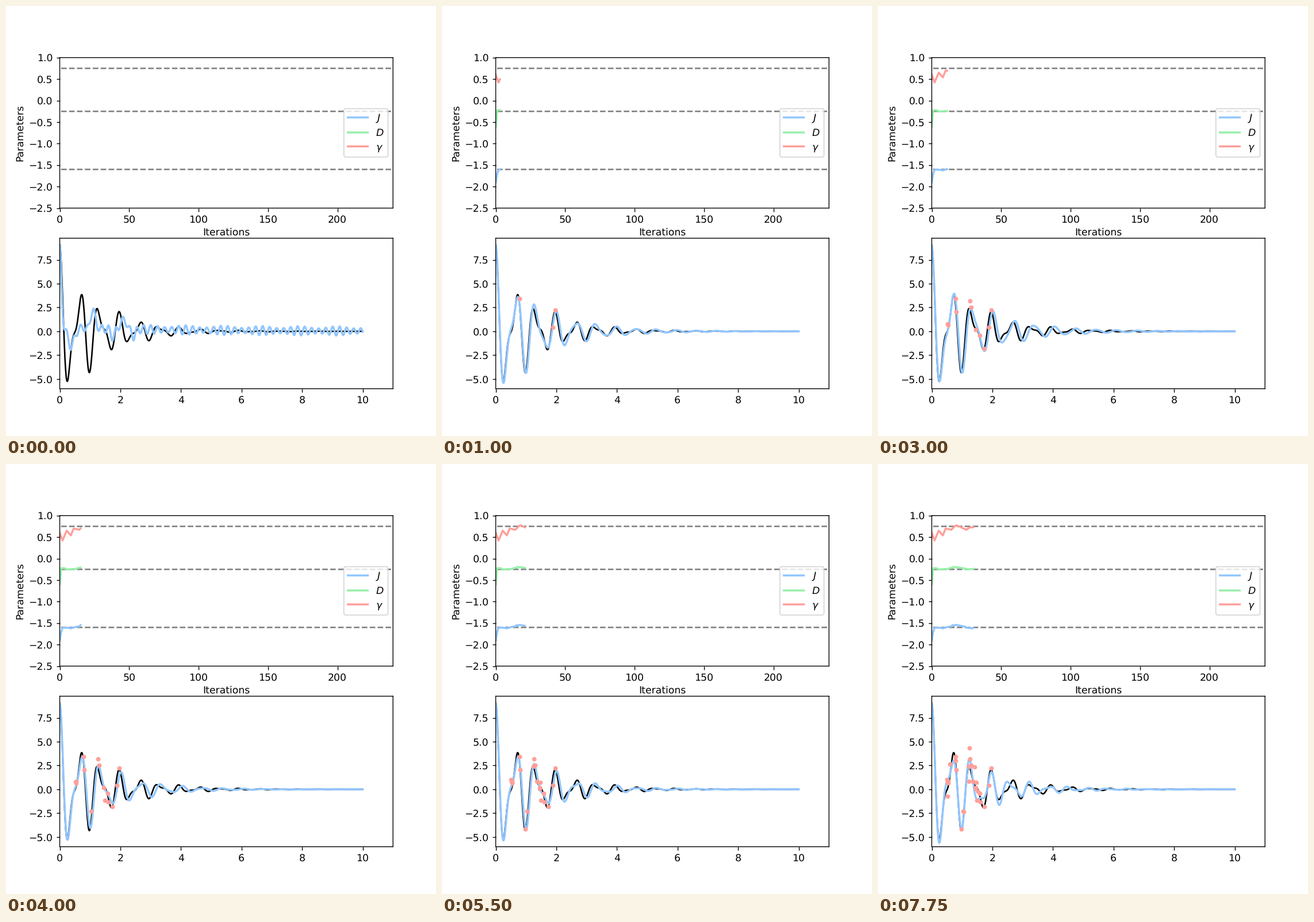
Write a matplotlib script that moves like this. It is 748x748 px and loops after 8 s.

```python
import numpy as np
import matplotlib.pyplot as plt
from matplotlib.animation import FuncAnimation

plt.rcParams.update({"text.hinting": "none", "path.snap": False})

BLUE, GREEN, RED = "#92C6FF", "#97F0AA", "#FF9F9A"
FRAMES, INTERVAL = 32, 250

rng = np.random.default_rng(4)
n_all = np.arange(FRAMES)
t = np.linspace(0, 10, 1000)


def signal(t, slow, slow_decay, fast, fast_decay):
    """Two damped cosines, the slow one twice as strong."""
    return (6.03 * np.exp(-slow_decay * t) * np.cos(slow * t)
            + 3.02 * np.exp(-fast_decay * t) * np.cos(fast * t))


def truth(t):
    return signal(t, 9.55, .75, 16.05, .75)


def prior():
    """A few early bumps, then a beating ripple that never dies out."""
    bumps = [(0, .08, 8.2), (.38, .15, -1.9), (1.1, .1, 2),
             (1.75, .1, -.8), (2.1, .13, 1), (2.44, .07, -.9)]
    swing = .38 + .11 * np.cos(2 * np.pi * (t - 5.4) / 1.25)
    base = .4 * np.exp(-t / 4) + swing * np.cos(27.2 * t)
    return base + sum(h * np.exp(-((t - c) / w) ** 2) for c, w, h in bumps)


# step, slow frequency, its decay, fast frequency, its decay
FITS = np.array([(4, 9.47, .66, 15.6, .85),
                 (8, 9.20, .52, 15.8, 1.0),
                 (16, 9.32, .76, 15.4, .85),
                 (22, 9.42, .75, 15.5, .8),
                 (27, 9.55, .77, 15.5, .78),
                 (31, 9.75, .75, 15.6, .75)]).T
PRIOR = prior()


def estimate(n):
    fit = signal(t, *(np.interp(n, FITS[0], row) for row in FITS[1:]))
    doubt = np.exp(-1.5 * n)
    return doubt * PRIOR + (1 - doubt) * fit


def settle(level, offset, rate, swing, peak):
    """Exponential approach with a slow wave and a little jitter."""
    wave = swing * np.cos(2 * np.pi * (n_all - peak) / 20)
    return (level + offset * np.exp(-rate * n_all) + wave
            + rng.normal(0, .006, FRAMES))


J = settle(-1.58, -.35, .9, .035, 18)
D = settle(-.225, -.39, 3, .025, 17.5)
GAMMA = np.interp(n_all, [0, 2, 5, 8, 10, 14, 17.5, 25, 27, 30],
                  [.6, .42, .65, .54, .7, .67, .78, .67, .72, .73])

# noisy readings at random moments of the strong part of the signal
when = rng.uniform(.4, 2.1, FRAMES)
reading = truth(when) + rng.normal(0, .9, FRAMES)

fig, (top, low) = plt.subplots(2, 1, figsize=(6, 6), dpi=124.667)

steps = np.arange(1, 240)
for level in (.75, -.25, -1.6):
    top.plot(steps, np.full(len(steps), level), "--", color="gray", lw=1.5)
tracks = [(top.plot([], [], color=c, lw=2, label=name)[0], values)
          for c, name, values in ((BLUE, "$J$", J), (GREEN, "$D$", D),
                                  (RED, r"$\gamma$", GAMMA))]
top.set(xlim=(0, 240), ylim=(-2.5, 1), xlabel="Iterations", ylabel="Parameters")
top.legend(loc="center right", labelspacing=.45)

low.plot(t, truth(t), color="black", lw=1.5)
guess, = low.plot([], [], color=BLUE, lw=2)
dots, = low.plot([], [], "o", color=RED, ms=4, mew=.5)
low.set(xlim=(0, 11), ylim=(-6.02, 9.77))


def draw(n):
    for line, values in tracks:
        line.set_data(n_all[:n], values[:n])
    guess.set_data(t, estimate(n))
    seen = max(n - 1, 0)
    dots.set_data(when[:seen], reading[:seen])
    return [line for line, _ in tracks] + [guess, dots]


anim = FuncAnimation(fig, draw, frames=FRAMES, interval=INTERVAL, repeat=True)
plt.show()
```
